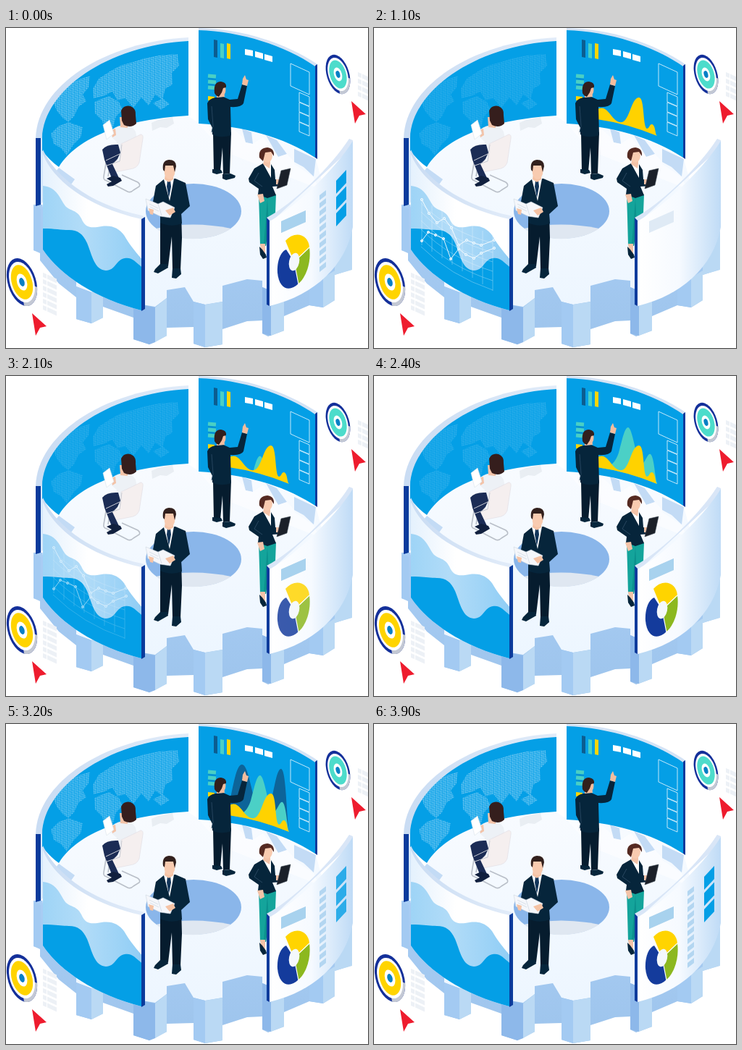
An HTML page that plays this animation: 500 by 442 pixels, repeating every 4000 ms.

```html
<!DOCTYPE html>
<html lang="en">
<head>
<meta charset="utf-8">
<title>Analytics room</title>
<style>
  html, body { margin: 0; width: 100%; height: 100%; overflow: hidden; background: #fff; }
  svg { display: block; width: 500px; height: 442px; }
</style>
</head>
<body>
<svg viewBox="0 0 500 442">
  <defs>
    <pattern id="dots" width="2.5" height="2.5" patternUnits="userSpaceOnUse" patternTransform="skewY(-14)">
      <circle cx="1.25" cy="1.25" r=".85" fill="#a6dcf8"/>
    </pattern>
    <linearGradient id="floor" x2="0" y2="1">
      <stop stop-color="#f8fbff"/><stop offset="1" stop-color="#edf6ff"/>
    </linearGradient>
    <linearGradient id="side" x2="0" y2="1">
      <stop stop-color="#a9cdf4"/><stop offset="1" stop-color="#9dc4ec"/>
    </linearGradient>
    <linearGradient id="glass">
      <stop stop-color="#fff"/><stop offset=".5" stop-color="#f6faff"/><stop offset="1" stop-color="#bfdbf6"/>
    </linearGradient>
    <linearGradient id="frost">
      <stop stop-color="#e4f1fd"/><stop offset=".45" stop-color="#fff"/>
    </linearGradient>
    <linearGradient id="haze">
      <stop stop-color="#9ed4f6"/><stop offset=".4" stop-color="#b2dcf8"/><stop offset="1" stop-color="#8fcdf5"/>
    </linearGradient>
    <linearGradient id="rim">
      <stop stop-color="#c9dcf3"/><stop offset="1" stop-color="#e2ecf9"/>
    </linearGradient>
    <clipPath id="plot"><path d="M308 45H391V149Q350 132 308 126Z"/></clipPath>
    <clipPath id="leftPanel"><path d="M51 174C64 208 108 246 187 264V390C125 374 75 342 51 306Z"/></clipPath>
  </defs>

  <!-- gear -->
  <path fill="url(#side)" d="M38 244H60L75 300 476 260V334L454 341V376L438 386 419 383 384 398V418L362 426 354 422V404L333 405 299 416V437L275 441 259 436V413L222 414V425L198 437 176 430V400L134 385V400L118 408 97 402V372L73 353 47 321V311L38 307Z"/>
  <path fill="url(#floor)" d="M50 242 75 190C105 142 185 124 252 122L266 131C330 136 385 152 428 181L440 225 470 290 452 300 452 312 438 345 419 341 384 355 384 358 366 363 354 358V349L333 347 299 356V378L275 382 259 378 247 358 222 362V373L206 385 176 380V370L134 357 118 365 97 357V343L73 320 60 300Z"/>
  <g fill="#a3caf2">
    <path d="M38 246 48 250V310L38 307ZM97 357 118 365V408L97 402ZM259 378 275 382V441L259 436ZM419 341 438 345V386L419 383Z"/>
    <path fill="#8db8ea" d="M176 380 206 386V434L198 437 176 430ZM354 358 366 363V425L354 422Z"/>
    <path fill="#bad9f4" d="M118 365 134 357V400L118 408ZM206 386 222 373V425L206 434ZM275 382 299 378V437L275 441ZM366 363 384 357V418L366 425ZM438 345 454 335V376L438 386ZM454 300 478 280V334L454 341Z"/>
    <path fill="#c3dbf5" d="M326 139 339 144 341 160 331 158ZM359 148 374 155 388 174 376 178ZM398 167 428 181 425 205 411 192 398 185ZM73 193 95 209 90 216 65 203Z"/>
  </g>
  <path fill="#fff" d="M266 132Q292 133 312 138L326 150 331 158 341 160 355 151 376 178 388 174 398 185V188L425 206 432 222 300 170Z" opacity=".55"/>
  <ellipse cx="259" cy="253" rx="66" ry="38" fill="#8ab6ea"/>
  <path fill="#dfe7f1" d="M207 277Q258 266 311 277C283 296 234 296 207 277Z"/>

  <!-- rear left screen -->
  <path fill="url(#rim)" d="M41 152C43 80 136 19 252 13V20L50 156Z"/>
  <path fill="#0b3b9c" d="M41 152H48V244L41 246Z"/>
  <path fill="#d6e8fa" d="M48 152H51V240L48 244Z"/>
  <path fill="#049fe6" d="M50 152C52 86 140 24 252 18V121C180 125 103 144 73 192Q59 182 50 169Z"/>
  <g id="map" fill="url(#dots)">
    <path d="M66 104Q80 82 98 72L116 66 114 82 106 92 111 101 100 109 94 122 86 130 78 124 70 114Z"/>
    <path d="M62 146 72 136 86 130 106 137 103 151 93 161 84 176 76 166 66 160Z"/>
    <path d="M120 84 128 70 145 59 158 52 176 47 190 42 211 38 237 36 239 52 229 62 230 78 220 84 216 99 206 92 197 107 187 96 176 110 165 97 154 100 147 88 134 94 121 97Z"/>
    <path d="M122 102 142 94 156 102 161 113 152 122 147 140 137 143 133 128 123 118Z"/>
    <path d="M203 104 216 97 226 105 214 113Z"/>
  </g>
  <path fill="#d6dde5" opacity=".45" d="M201 131 210 127 230 123 232 132 222 138 213 137 202 142Z"/>

  <!-- rear right screen -->
  <path fill="#d4e3f5" d="M266 0C325 1 385 20 430 50V56L266 8Z"/>
  <path fill="#049fe6" d="M266 3C325 5 385 24 427 53V179C382 150 330 136 266 132Z"/>
  <path fill="#0b3b9c" d="M427 52 430 50V181L427 179Z"/>
  <path fill="#0c5d90" d="M287 16 292 17V41L287 40Z"/>
  <path fill="#4acfc4" d="M296 21 301 22V42L296 41Z"/>
  <path fill="#ffd500" d="M305 21 310 22V43L305 42Z"/>
  <path fill="#fff" d="M330 29 341 31V39L330 37ZM344 32 355 35V43L344 40ZM357 36 368 39V47L357 44Z"/>
  <path fill="none" stroke="#d7f0fc" stroke-width=".9" d="M393 49 419 61V92L393 80Z"/>
  <g id="boxes" fill="none" stroke="#d7f0fc" stroke-width=".9"></g>
  <path stroke="#4acfc4" stroke-width="5" d="M279 66 290 67M279 74 290 75M279 82 290 83"/>
  <path stroke="#0c84bd" d="M279 70 290 71M279 78 290 79"/>
  <path fill="#ffd500" d="M279 94 288 95V101L279 100Z"/>
  <g id="waves" clip-path="url(#plot)">
    <path id="dark" fill="#0d6499" d="M308 112C314 85 318 56 326 56 335 56 339 98 347 113 354 125 362 118 367 103 371 87 374 62 380 62 387 64 387 120 391 148V250H308Z"/>
    <path id="teal" fill="#4bd0c6" d="M308 118C320 130 331 126 338 106 343 88 346 71 351 71 357 72 361 108 367 120 373 128 377 105 382 108 387 112 388 140 391 148V250H308Z"/>
    <path id="gold" fill="#ffd200" d="M308 113C315 108 320 111 327 120 334 129 341 134 347 127 354 119 357 96 366 96 374 96 371 137 377 139 381 138 380 133 384 133 389 134 388 147 391 149V250H308Z"/>
  </g>

  <!-- presenter -->
  <g fill="#06253b">
    <path fill="#061c2e" d="M286 145 311 144 309 201 300 202 299 165 296 198 287 197Z"/>
    <path d="M278 104Q280 98 289 96L300 95 309 99 320 98 326 78 333 80 328 104Q325 110 310 109L311 148Q296 153 285 147L285 138 279 126Z"/>
    <path d="M285 195 297 196 299 200 291 202 285 200ZM299 202 310 201 317 204 316 207 304 210 299 208Z"/>
    <path fill="#f3bd9e" d="M326 78 327 70 330 65 332 71 335 72 333 80ZM291 88 301 87 302 95 291 96Z"/>
    <ellipse cx="297" cy="85" rx="6.5" ry="9.5" fill="#f3bd9e"/>
    <path fill="#32201d" d="M288 90Q286 74 297 74 305 75 304 82L300 83 298 89 294 95Q290 94 288 90Z"/>
    <path stroke="#25445e" fill="none" d="M284 108 286 135 284 144"/>
  </g>

  <!-- seated colleague -->
  <g>
    <path fill="none" stroke="#b9bfc8" stroke-width="1.6" d="M139 181 135 205Q134 210 139 211L168 226Q172 228 176 224L184 219Q186 216 182 213L160 203M145 181 141 205"/>
    <path fill="#edf1f6" d="M147 140Q154 134 166 134 179 137 180 148L181 163 167 176 151 171 153 157 146 151Z"/>
    <path fill="#f3c3a8" d="M157 123H168V138L158 137ZM145 141 151 139 152 148 147 151Z"/>
    <path fill="#351e1d" d="M159 114Q163 106 172 108 180 111 179 121L180 132Q173 139 163 134L160 128Z"/>
    <path fill="#f5efef" stroke="#dfdce2" stroke-width=".6" d="M159 160Q172 154 186 147 190 147 189 153L184 186Q181 194 171 195L151 199 139 190V182L157 184Z"/>
    <path fill="#1b2c55" d="M133 168Q139 160 155 161L158 172 154 181 147 188 156 207 147 210 136 182Z"/>
    <path fill="#11203e" d="M139 208 148 204 158 207 160 211 148 218 141 219 139 216 146 212Z"/>
    <path fill="#fff" stroke="#d9e1ea" stroke-width=".6" d="M134 134 143 127 149 146 139 154Z"/>
    <path fill="none" stroke="#c9ccd3" d="M138 183 157 174M139 190 157 184 160 161"/>
  </g>

  <!-- man with notes -->
  <g fill="#06253b">
    <path fill="#061c2e" d="M213 255 242 254 243 290 241 334 230 334 229 288 224 329 213 328Z"/>
    <path d="M213 326 223 326 224 331 210 339 204 337 206 333ZM230 332 241 332 242 340 235 346 229 345Z"/>
    <path d="M207 218 218 209 234 208 248 214 254 246 242 257 243 270Q228 276 213 269L213 255 203 240Z"/>
    <path fill="#fff" d="M218 209 232 208 226 239Z"/>
    <path fill="#12355a" d="M223 211 227 211 228 219 225 235 222 219Z"/>
    <path fill="#f5c3a5" d="M220 200H231V209L225 213 219 209Z"/>
    <ellipse cx="226" cy="197" rx="7.5" ry="12" fill="#f8cbb0"/>
    <path fill="#32201d" d="M217 196Q215 183 225 182 235 182 235 191L233 199 231 190 220 190 219 198Z"/>
    <path fill="#f5f7fb" stroke="#cbd5e0" stroke-width=".6" d="M193 236 210 243 217 240 233 248 227 262 213 260 196 252Z"/>
    <path stroke="#cbd5e0" stroke-width=".7" d="M210 243 215 259M198 243 210 249M199 247 211 253"/>
    <path fill="#f5c3a5" d="M220 252 231 248 234 254 226 259ZM197 249 204 251 203 258 199 257Z"/>
  </g>

  <!-- woman with tablet -->
  <g fill="#06253b">
    <path fill="#14a49b" d="M349 230 373 230 372 256 362 276 359 301 351 300 350 262Z"/>
    <path fill="#0c918d" d="M361 236 363 273 359 301 356 300Z"/>
    <path fill="#f3c3a8" d="M351 298H358V314L353 311Z"/>
    <path d="M350 302 354 306 359 313 360 317 355 319 351 313Z"/>
    <path d="M343 194 355 187 366 188 371 196 372 209 382 211 382 218 368 219 373 231 361 235 348 230 349 222 336 213 335 208Z"/>
    <path fill="#fff" d="M355 187 366 188 366 207Z"/>
    <path fill="#f3c3a8" d="M357 180H365V188L364 194 355 188ZM347 230 355 229 357 239 351 242ZM373 209 379 209 379 216 373 216Z"/>
    <ellipse cx="361" cy="176" rx="7" ry="10" fill="#f8cbb0"/>
    <path fill="#552a22" d="M350 179Q348 166 361 165 371 166 370 177L366 171 358 172 355 184Z"/>
    <path fill="#1b2029" stroke="#3a4350" stroke-width=".6" d="M380 197 393 194 388 217 374 222Z"/>
    <path fill="none" stroke="#294760" d="M349 200 343 211 354 219"/>
  </g>

  <!-- front left panel -->
  <path fill="url(#rim)" d="M51 168C66 202 112 243 188 259L192 261 187 266C105 249 62 211 51 176Z"/>
  <g clip-path="url(#leftPanel)">
    <path fill="url(#frost)" d="M50 170H190V392H50Z"/>
    <path fill="url(#haze)" d="M50 218C70 219 74 235 82 246 89 253 98 251 104 263 110 278 120 276 132 274 147 272 156 277 163 286 171 300 178 308 190 322V392H50Z"/>
    <path fill="#049fe6" d="M50 277C68 277 75 279 87 279 99 279 106 284 112 297 119 314 122 334 138 335 151 335 152 320 164 318 175 316 180 325 190 332V392H50Z"/>
    <g id="lines" fill="none" stroke="#fff"></g>
  </g>
  <path fill="#0b3b9c" d="M187 264 192 261V388L187 391Z"/>

  <!-- front right panel -->
  <path fill="#d9e6f7" d="M360 262C397 243 450 190 474 153L479 155V164L364 270Z"/>
  <path fill="url(#glass)" d="M364 267C400 247 455 195 479 156V275C470 326 428 369 364 384Z"/>
  <path fill="#0b3b9c" d="M360 262 364 266V384L360 382Z"/>
  <path fill="#dfeaf5" d="M380 267 414 252V268L380 283Z"/>
  <path id="header" fill="#a8d2ee" d="M380 267 414 252V268L380 283Z"/>
  <g id="pie">
    <path fill="#ffd400" d="M398 323 386 294C399 279 418 285 419 303Z"/>
    <path fill="#8cb81f" d="M398 323 419 303C422 324 414 345 404 353Z"/>
    <path fill="#143b9c" d="M398 323 404 353C391 366 377 360 375 338 374 323 379 309 387 306Z"/>
    <path fill="none" stroke="#fff" stroke-width="1.2" d="M398 323 387 302M398 323 419 303M398 323 404 354"/>
    <ellipse cx="398" cy="323" rx="7" ry="12.5" transform="rotate(12 398 323)" fill="#f4f8fc"/>
  </g>
  <g id="stripes" fill="#b3d6f1"></g>
  <g id="blocks" fill="#049fe6"></g>

  <g id="badges"></g>
</svg>
<script>
  const $ = id => document.getElementById(id);
  const repeat = (n, draw) => Array.from({ length: n }, (_, i) => draw(i)).join('');

  $('boxes').innerHTML = repeat(4, i => {
    const y = 89 + i * 13.7;
    return `<path d="M405 ${y}l14 6v13l-14-6z"/>`;
  });

  $('stripes').innerHTML = repeat(10, i =>
    `<path d="M433 ${231 + i * 11}l9-7v7l-9 7z"/>`);
  $('blocks').innerHTML = repeat(3, i =>
    `<path d="M456 ${211 + i * 22.5}l14-15v18l-14 15z"/>`);

  const chart = points => {
    const pairs = points.split(' ').map(p => p.split(','));
    return `<polyline points="${points}" stroke-width=".9"/>` + pairs.map(([x, y]) =>
      `<circle cx="${x}" cy="${y}" r="1.6" fill="#bfe5fb" stroke-width=".8"/>`).join('');
  };
  const grid = repeat(8, i => `<path d="M${66 + i * 14} ${238 + i * 7}v${62 + i * 2}"/>`) +
    repeat(6, i => `<path d="M65 ${242 + i * 12}Q105 ${282 + i * 12} 164 ${297 + i * 13}"/>`);
  $('lines').innerHTML = `<g stroke-width=".6" opacity=".5">${grid}</g>` +
    chart('66,237 76,256 87,269 97,263 107,276 117,300 128,293 138,297 148,300 166,293') +
    chart('66,294 75,282 85,286 96,291 106,319 117,305 127,313 138,318 148,311 166,304');

  // Tilted target, its caption bars and its cursor
  const target = (x, y, rx, ry, color) => {
    const ring = (k, fill) => `<ellipse rx="${rx * k}" ry="${ry * k}" fill="${fill}"/>`;
    return `<g transform="translate(${x} ${y}) rotate(-17)">` +
      ring(1, '#14309a') +
      `<path fill="#c3c8d4" d="M0 0L${-rx * .35} ${ry * .94}A${rx} ${ry} 0 0 0 ${rx * .93} ${ry * .37}Z"/>` +
      ring(.85, '#fff') + ring(.72, color) + ring(.35, '#fff') + ring(.18, '#087fc5') + '</g>';
  };
  const caption = (x, y, n) => repeat(n, i =>
    `<path d="M${x} ${y + i * 9}l5 2v6l-5-2zm6 2.5l13 6v6l-13-6z" fill="#edf1f6"/>`);
  const cursor = (x, y) =>
    `<path transform="translate(${x} ${y})" fill="#ee1c2e" d="M0 0L20 18 11 20 5 31Z"/>`;
  $('badges').innerHTML =
    target(458.5, 64, 15.5, 28, '#4ddccb') + caption(486, 61, 4) + cursor(477, 101) +
    target(22, 351, 19.5, 34, '#ffd400') + caption(51, 338, 6) + cursor(36, 394);

  const ramp = (t, from, to) => Math.min(1, Math.max(0, (t - from) / (to - from)));
  const fade = (id, opacity) => $(id).setAttribute('opacity', opacity);
  const rise = (id, depth, k) => $(id).setAttribute('transform', `translate(0 ${depth * (1 - k)})`);
  const dip = (t, a, b, c, d) => 1 - ramp(t, a, b) + ramp(t, c, d);

  function frame(now) {
    const t = Math.floor(now % 4000 / 100) * 100;
    fade('map', .38 + .57 * dip(t, 200, 800, 2700, 3300));
    fade('lines', ramp(t, 200, 900) - ramp(t, 1900, 2400));
    fade('header', dip(t, 200, 500, 1300, 1800));
    fade('pie', dip(t, 400, 900, 1600, 2200));
    fade('stripes', dip(t, 450, 1000, 2400, 2800));
    fade('blocks', dip(t, 500, 1100, 2800, 3300));
    rise('gold', 50, ramp(t, 400, 1000));
    rise('teal', 66, ramp(t, 1900, 2400));
    rise('dark', 88, ramp(t, 2400, 2850));
    fade('waves', 1 - ramp(t, 3400, 3850));
    requestAnimationFrame(frame);
  }
  requestAnimationFrame(frame);
</script>
</body>
</html>
```
